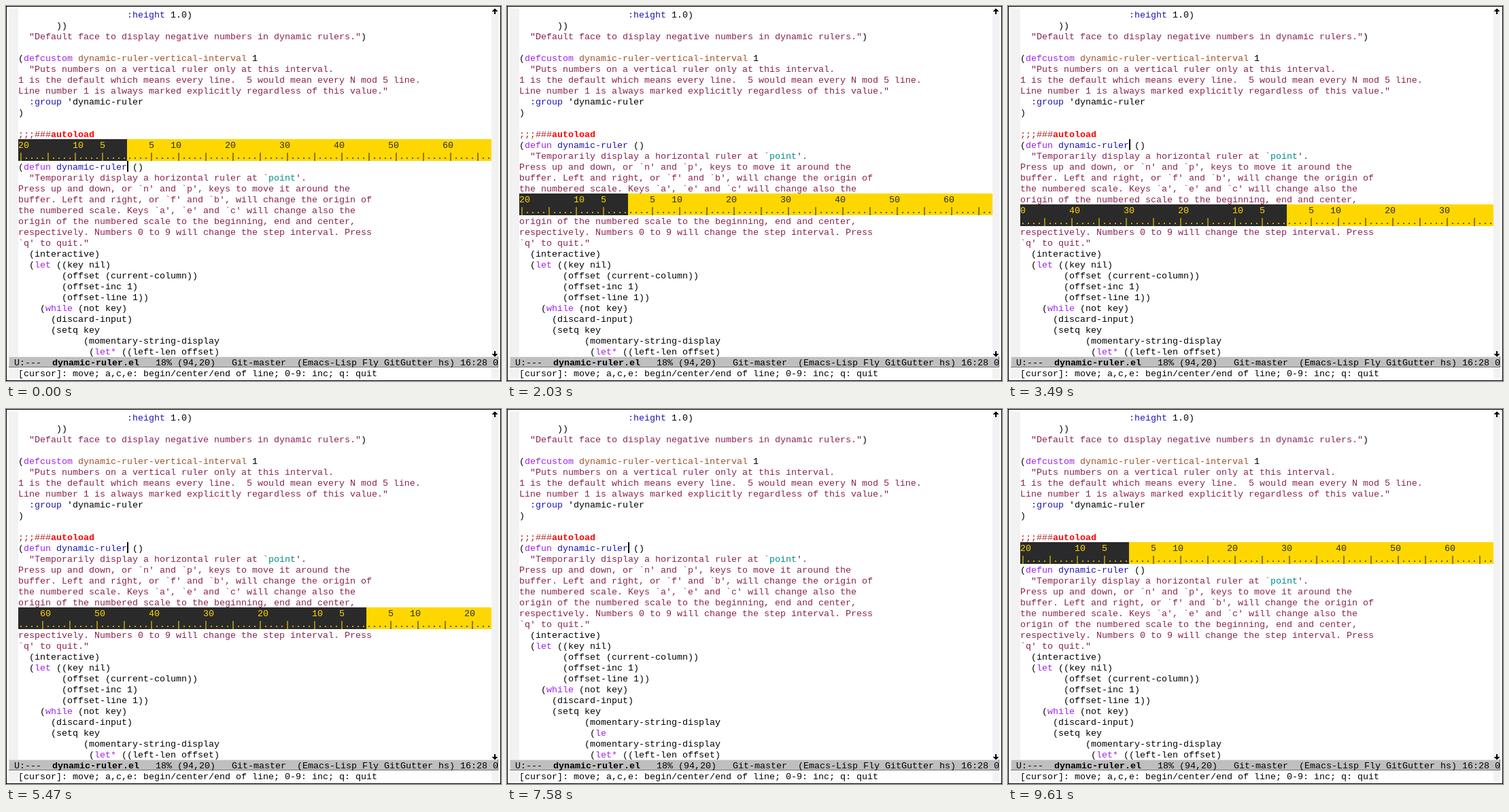
Recreate the animation shown at these times as an HTML page. Size 728 by 552 pixels, loop 9.85 s.

```html
<!DOCTYPE html>
<html lang="en">
<head>
<meta charset="utf-8">
<title>Dynamic ruler</title>
<style>
  html, body { margin: 0; width: 100%; height: 100%; overflow: hidden; background: #fff; }
  svg { display: block; width: 728px; height: 552px; }
  text { font: 13.33px "Liberation Mono", monospace; white-space: pre; }
  rect, path { shape-rendering: crispEdges; }
  .t { fill: #000; }
  .k { fill: #a020f0; }
  .f { fill: #1c14b8; }
  .v { fill: #a0522d; }
  .s { fill: #8b2252; }
  .c { fill: #008b8b; }
  .m { fill: #b22222; }
  .w { fill: #f00; font-weight: bold; }
  .b { fill: #000; font-weight: bold; }
  .p { fill: #0000cd; }
  .gold { fill: #ffd700; }
  .dark { fill: #2a2a2a; }
</style>
</head>
<body>
<svg viewBox="0 0 728 552">
  <rect width="728" height="552"/>
  <rect x="1" y="1" width="726" height="550" fill="#fff"/>
  <rect x="4" y="4" width="14" height="544" fill="#f2f2f2"/>
  <rect x="714" y="4" width="10" height="544" fill="#f2f2f2"/>
  <path id="up" transform="translate(715 4)" d="M3 0h2v1h1v1h1v1h1v1h-3v4h-2v-4h-3v-1h1v-1h1v-1h1z"/>
  <use href="#up" transform="translate(0 520) scale(1 -1)"/>
  <rect x="4" y="516" width="720" height="16" fill="#bfbfbf"/>
  <path d="M4 516h720v1h-719v15h-1z" fill="#e5e5e5"/>
  <path d="M724 532h-720v-1h719v-15h1z" fill="#737373"/>
  <g id="mode"></g>
  <g id="rows"></g>
  <g id="echo"></g>
  <rect id="cursor" width="2" height="16"/>
</svg>
<script>
const LOOP = 9850, LEFT = 18, TOP = 4, CW = 8, LH = 16, COLS = 87, ROWS = 32, NAME_LINE = 12;
const $ = id => document.getElementById(id);
const rowY = row => TOP + row * LH;
const colX = col => LEFT + col * CW;

// Segments are split by "|"; the first letter of each names its face.
const LINES = String.raw`t                    |f:height|t 1.0)
t       ))
t  |s"Default face to display negative numbers in dynamic rulers."|t)

t(|kdefcustom|t |vdynamic-ruler-vertical-interval|t 1
t  |s"Puts numbers on a vertical ruler only at this interval.
s1 is the default which means every line.  5 would mean every N mod 5 line.
sLine number 1 is always marked explicitly regardless of this value."
t  |f:group|t 'dynamic-ruler
t)

m;;;###|wautoload
t(|kdefun|t |fdynamic-ruler|t ()
t  |s"Temporarily display a horizontal ruler at ${"\x60"}|cpoint|s'.
sPress up and down, or ${"\x60"}n' and ${"\x60"}p', keys to move it around the
sbuffer. Left and right, or ${"\x60"}f' and ${"\x60"}b', will change the origin of
sthe numbered scale. Keys ${"\x60"}a', ${"\x60"}e' and ${"\x60"}c' will change also the
sorigin of the numbered scale to the beginning, end and center,
srespectively. Numbers 0 to 9 will change the step interval. Press
s${"\x60"}q' to quit."
t  (interactive)
t  (|klet|t ((key nil)
t        (offset (current-column))
t        (offset-inc 1)
t        (offset-line 1))
t    (|kwhile|t (not key)
t      (discard-input)
t      (setq key
t            (momentary-string-display
t             (|klet*|t ((left-len offset)
t                    (right-len (- (window-width)
t                                  left-len))`.split("\n");

const HELP = "t[cursor]: move; a,c,e: begin/center/end of line; 0-9: inc; q: quit";
const MODE = "t U:---  |bdynamic-ruler.el|t   18% (94,20)   Git-master  (Emacs-Lisp Fly GitGutter hs) 16:28 0";

const esc = s => s.replace(/&/g, "&amp;").replace(/</g, "&lt;");
const textAt = (x, row, face, str) =>
  `<text xml:space="preserve" class="${face}" x="${x}" y="${rowY(row) + 13}">${esc(str)}</text>`;

function drawLine(line, row, cut = COLS + 9, x0 = LEFT) {
  let col = 0, out = "";
  for (const seg of line ? line.split("|") : []) {
    const str = seg.slice(1, 1 + Math.max(0, cut - col));
    if (str.trim()) out += textAt(x0 + col * CW, row, seg[0], str);
    col += seg.length - 1;
  }
  return out;
}

function labels(origin) {
  const cells = Array(COLS).fill(" ");
  const put = (str, start) => [...str].forEach((ch, i) => {
    if (start + i >= 0 && start + i < COLS) cells[start + i] = ch;
  });
  for (const n of [5, 10, 20, 30, 40, 50, 60, 70, 80]) {
    const str = String(n);
    put(str, origin - n);
    put(str, origin + n - str.length);
  }
  return cells.join("");
}

function ticks(origin) {
  return Array.from({ length: COLS }, (_, c) =>
    (c < origin ? origin - c : c - origin + 1) % 5 ? "." : "|").join("");
}

const band = (from, to, row, height, face) =>
  `<rect class="${face}" x="${colX(from)}" y="${rowY(row)}" width="${(to - from) * CW}" height="${height * LH}"/>`;

function drawRuler(row, origin) {
  let out = band(0, origin, row, 2, "dark") + band(origin, COLS, row, 2, "gold");
  [labels(origin), ticks(origin)].forEach((str, i) => {
    out += textAt(LEFT, row + i, "gold", str.slice(0, origin));
    out += textAt(colX(origin), row + i, "dark", str.slice(origin));
  });
  return out;
}

// cursor: 0 hidden, 1 in the buffer, 2 in the minibuffer; row -1: no ruler
const STEPS = [
  [0, { row: 12, origin: 20, cursor: 1, echo: HELP, redraw: "" }],
  [60, { cursor: 0 }], [560, { cursor: 1 }], [1090, { cursor: 0 }], [1550, { cursor: 1 }],
  [1590, { row: 13 }],
  [1810, { row: 14, redraw: "ruler" }],
  [1850, { row: 16, redraw: "" }],
  [1890, { row: 17 }],
  [2030, { cursor: 0 }],
  [2400, { row: 18 }],
  [2520, { cursor: 1 }],
  [2630, { origin: 21 }],
  ...Array.from({ length: 16 }, (_, i) => [
    Math.round((2880 + i * 610 / 15) / 10) * 10,
    { origin: Math.round(26 + (i - 2) * 23 / 13), cursor: i < 3 || i === 15 ? 1 : 0 }
  ]),
  [4010, { cursor: 0 }],
  [4320, { origin: 54 }],
  [4480, { cursor: 1 }],
  [4520, { origin: 59 }],
  [4710, { origin: 64 }],
  [4970, { cursor: 0 }], [5470, { cursor: 1 }],
  [5510, { origin: 69 }],
  [5960, { cursor: 0 }], [6460, { cursor: 1 }], [6960, { cursor: 0 }], [7450, { cursor: 1 }],
  [7580, { row: -1, redraw: "quit" }],
  [7620, { redraw: "", echo: "" }],
  [7940, { cursor: 0 }], [8440, { cursor: 1 }],
  [8520, { cursor: 2, echo: "pM-x " }],
  [8680, { echo: "pM-x |tdynamic-ruler" }],
  [9110, { cursor: 1, echo: "" }],
  [9150, { row: 12, origin: 20, echo: HELP }],
  [9610, { cursor: 0 }]
];
let last = {};
const STATES = STEPS.map(([at, change]) => (last = { ...last, ...change, at }));

function drawRows({ row, origin, redraw }) {
  let out = "";
  LINES.forEach((line, i) => {
    const y = row >= 0 && i >= row ? i + 2 : i;
    if (y >= ROWS || (redraw === "quit" && i > 29)) return;
    let cut;
    if (redraw === "ruler" && i === 13) cut = 46;
    if (redraw === "quit" && i === 29) cut = 16;
    out += drawLine(line, y, cut);
  });
  // rows still waiting to be repainted
  if (redraw === "ruler")
    out += band(46, COLS, 13, 1, "gold") + textAt(colX(46), 13, "dark", labels(origin).slice(46));
  if (redraw === "quit")
    out += drawLine(LINES[28], 30) + drawLine(LINES[29], 31);
  return row >= 0 ? out + drawRuler(row, origin) : out;
}

function show(state) {
  $("rows").innerHTML = drawRows(state);
  $("echo").innerHTML = drawLine(state.echo, 33);
  const mini = state.cursor === 2;
  const row = mini ? 33 : state.row === NAME_LINE ? NAME_LINE + 2 : NAME_LINE;
  const cursor = $("cursor");
  cursor.setAttribute("x", colX(mini ? 4 : 20));
  cursor.setAttribute("y", rowY(row));
  cursor.setAttribute("visibility", state.cursor ? "visible" : "hidden");
}

$("mode").innerHTML = drawLine(MODE, 32, 99, 4);

let current;
const start = performance.now();
function tick() {
  const t = (performance.now() - start) % LOOP;
  const state = STATES.findLast(s => s.at <= t);
  if (state !== current) show(current = state);
  requestAnimationFrame(tick);
}
tick();
</script>
</body>
</html>
```
